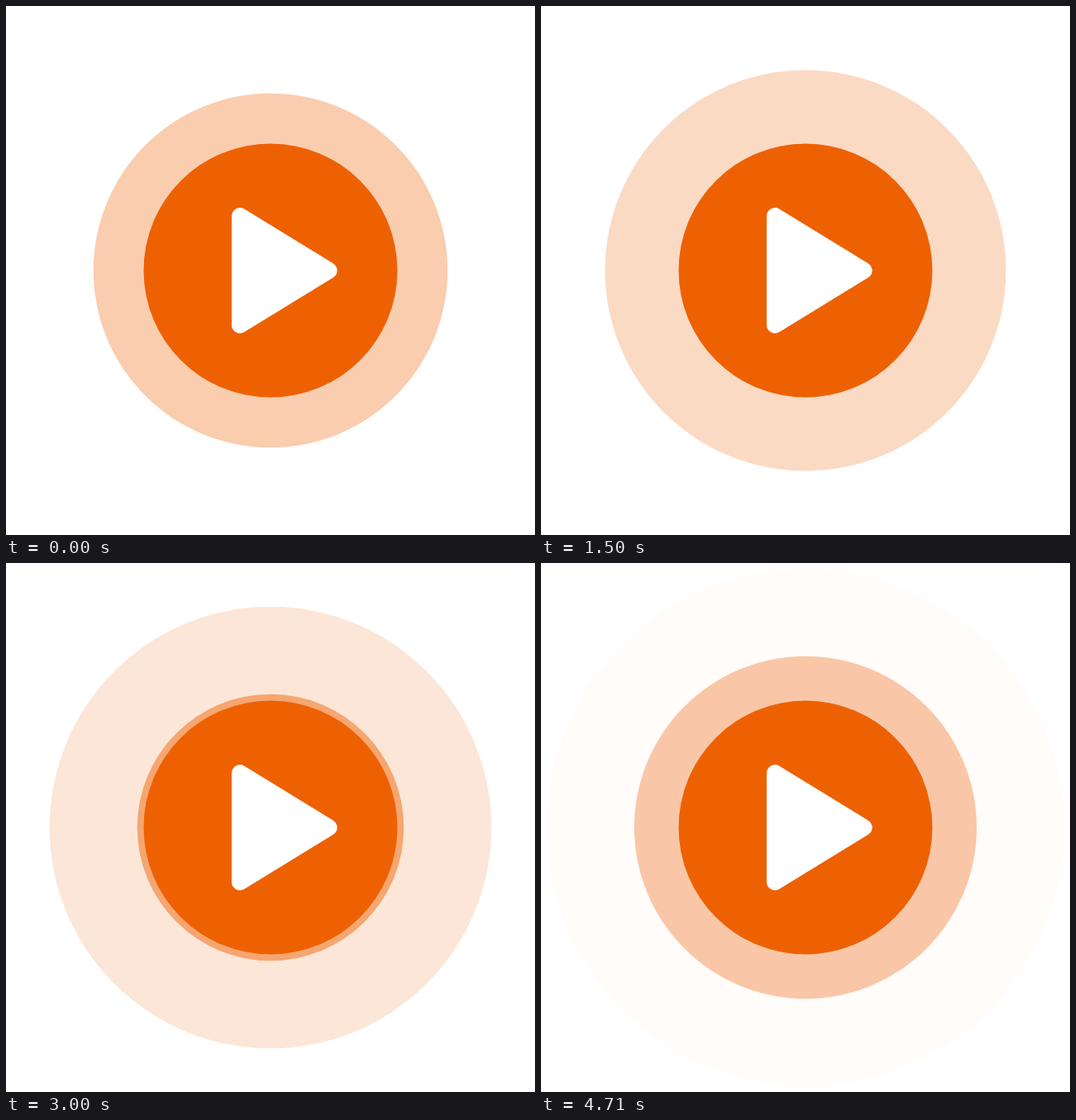
Animation of 640 by 640 pixels, one loop 4780 ms. Source, as an HTML page:

```html
<!DOCTYPE html>
<html lang="en">
<head>
<meta charset="utf-8">
<title>Pulsing play button</title>
<style>
  html, body { margin: 0; width: 100%; height: 100%; overflow: hidden; background: #fff; }
  svg { display: block; width: 100%; height: 100%; }
</style>
</head>
<body>
<svg viewBox="0 0 640 640">
  <g fill="#ed6103">
    <circle class="ring" cx="320" cy="320"/>
    <circle class="ring" cx="320" cy="320"/>
    <circle cx="320" cy="320" r="153.5"/>
  </g>
  <path d="M283 254 390.7 320 283 386Z" fill="#fff" stroke="#fff" stroke-width="20" stroke-linejoin="round"/>
</svg>
<script>
  const LOOP = 4780;      // ms
  const FPS = 14;         // shown pictures per second
  const RATE = 25;        // motion ticks per second
  const PERIOD = 30;      // ticks between two pulses
  const GAP = 106;        // px between two pulses
  const CORE = 153.5;
  const EDGE = 320;
  const rings = document.querySelectorAll('.ring');

  // Picture starts are rounded to 10 ms; motion advances in whole ticks.
  function tickAt(ms) {
    const shown = Math.floor((Math.floor(ms / 10) * 10 + 5) * FPS / 1000);
    return Math.ceil(shown * RATE / FPS);
  }

  function draw(ms) {
    const phase = tickAt(ms % LOOP) % PERIOD / PERIOD;
    rings.forEach((ring, i) => {
      const r = 108.25 + GAP * (phase + i);
      const fade = (EDGE - r) / (EDGE - CORE);
      ring.setAttribute('r', r.toFixed(2));
      ring.setAttribute('fill-opacity', (0.5 * Math.min(1, Math.max(0, fade))).toFixed(4));
    });
  }

  const start = performance.now();
  function loop() {
    draw(performance.now() - start);
    requestAnimationFrame(loop);
  }
  loop();
</script>
</body>
</html>
```
